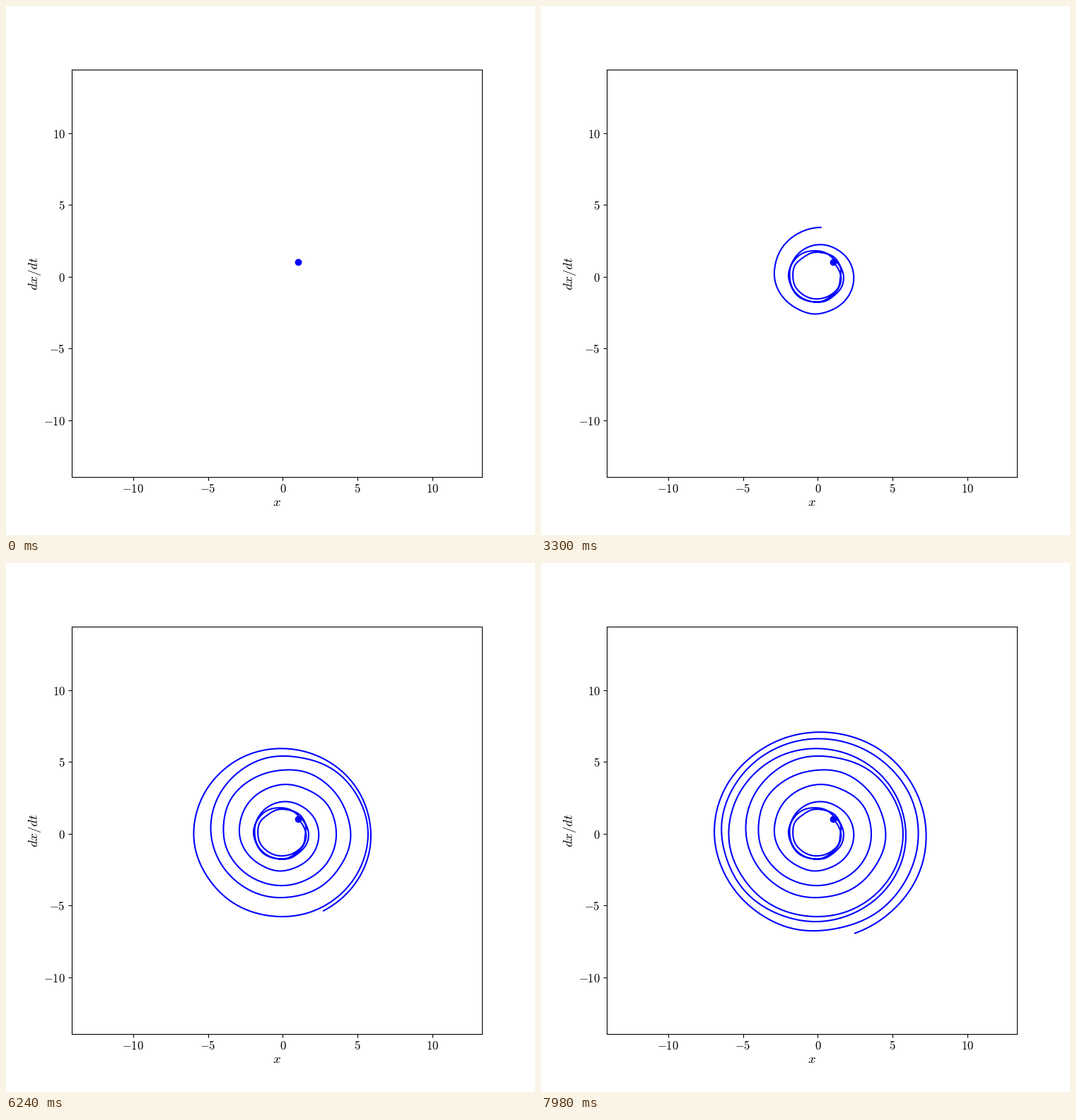
These frames come from a looping animation (748x748 px, 8 s). A matplotlib script:

```python
import numpy as np
import matplotlib.pyplot as plt
from matplotlib.animation import FuncAnimation

plt.rcParams["mathtext.fontset"] = "cm"

SIZE, DPI = 748, 100
TICK_MS, STEP_MS, LOOP_MS = 20, 60, 8000
SUB = 12  # curve samples per step
STEPS = LOOP_MS // STEP_MS

# Orbit radius at each half turn, where the path crosses dx/dt = 0
RADII = np.array([1.3, 1.51, 1.96, 1.55, 1.67, 1.73, 1.91, 2.42, 2.9, 3.58,
                  3.98, 4.5, 4.83, 5.7, 5.93, 5.87, 6.42, 6.71, 6.86, 7.23,
                  7.5])


def smooth(keys, u):
    """Catmull-Rom curve through keys at whole values of u."""
    i = np.floor(u).astype(int)
    f = u - i
    a, b, c, d = (keys[np.clip(i + k, 0, len(keys) - 1)] for k in (-1, 0, 1, 2))
    return b + 0.5 * f * (c - a + f * (2 * a - 5 * b + 4 * c - d
                                       + f * (3 * (b - c) + d - a)))


def orbit():
    """Clockwise spiral of a noisy oscillator, pushed hardest mid-way."""
    k = np.arange(STEPS * SUB + 1) / SUB
    turned = 25.28 * k + 8 * np.sin(np.pi * k / 100)
    phi = np.radians(45 - turned)
    push = 0.2 * np.sin(phi) * np.exp(-((turned / 360 - 4.7) / 1.5) ** 2)
    kicks = np.random.default_rng(4).normal(0, 0.025, STEPS + 2)
    r = smooth(RADII, turned / 180 + 0.75) + push + smooth(kicks, k)
    x, v = r * np.cos(phi), r * np.sin(phi)
    x[0] = v[0] = 1
    return x, v


def label(px, py, text, angle=0):
    fig.text(px / SIZE, 1 - py / SIZE, text, fontsize=13.5, rotation=angle,
             rotation_mode="anchor", ha="center", va="baseline")


fig = plt.figure(figsize=(SIZE / DPI, SIZE / DPI), dpi=DPI, facecolor="white")
ax = fig.add_axes(np.array([93.2, 81.7, 580, 576.5]) / SIZE)
ax.set_xlim(-14.1, 13.32)
ax.set_ylim(-13.98, 14.42)
ticks = range(-10, 11, 5)
names = [f"${t}$" for t in ticks]
ax.set_xticks(ticks, names, fontsize=12)
ax.set_yticks(ticks, names, fontsize=12)
ax.tick_params(axis="x", pad=2.4)
label(383.4, 707, "$x$")
label(45.5, 377.7, "$dx/dt$", 90)

xs, vs = orbit()
ax.plot(1, 1, "o", color="blue", markersize=6)
trail, = ax.plot([], [], color="blue", lw=1.5)


def draw(n):
    end = n * TICK_MS // STEP_MS * SUB + 1
    trail.set_data(xs[:end], vs[:end])
    return trail,


def init():
    return draw(0)


anim = FuncAnimation(fig, draw, frames=LOOP_MS // TICK_MS, init_func=init,
                     interval=TICK_MS, repeat=True, repeat_delay=0, blit=False)
plt.show()
```
